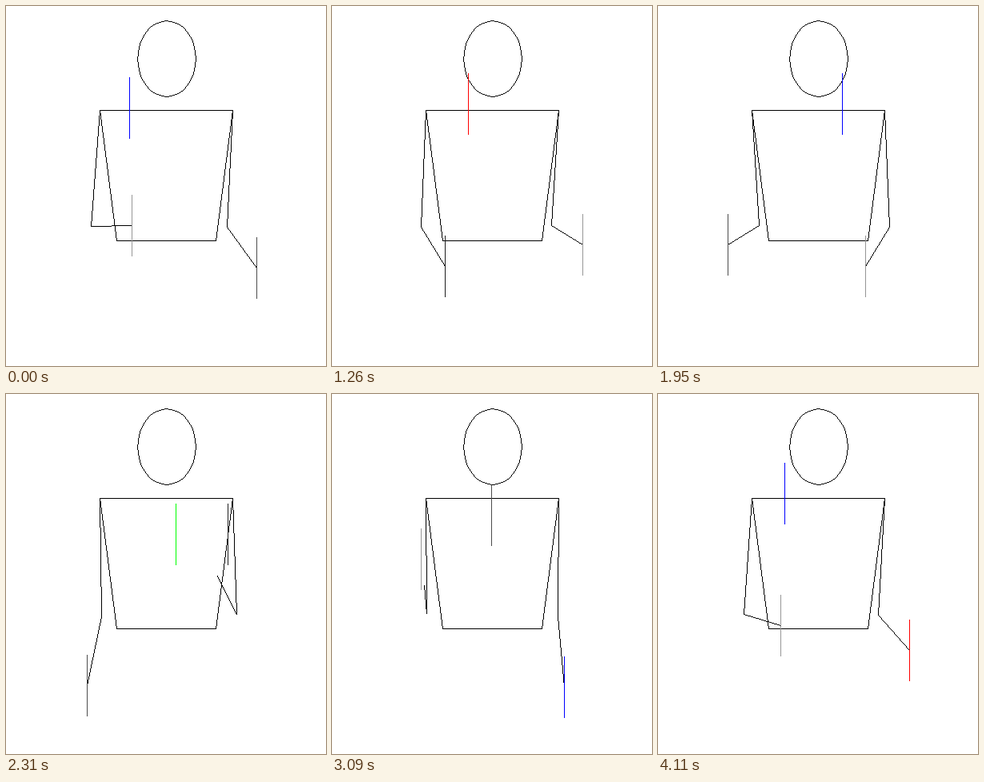
These frames come from a looping animation (400 px wide and 450 px high, 4.14 s). An HTML page with a canvas:

```html
<!DOCTYPE html>
<html lang="en">
<head>
<meta charset="utf-8">
<title>Three-stick cascade</title>
<style>
html, body { margin: 0; width: 100%; height: 100%; overflow: hidden; background: #fff; }
canvas { display: block; width: 400px; height: 450px; }
</style>
</head>
<body>
<canvas id="stage" width="400" height="450"></canvas>
<script>
const ctx = document.getElementById('stage').getContext('2d');

// All times are in steps of 30 ms.
const STEP = 30, LOOP = 138, BEAT = 23, CYCLE = 2 * BEAT, ORBIT = 3 * BEAT;
const FLIGHT = 39, HOLD = ORBIT - FLIGHT, EMPTY = CYCLE - HOLD;

const WIDTH = 400, BASE_Y = 273.9, THROW_X = 156.7, CATCH_X = 92, SPEED = 3.88;
const HALF = 38;                       // half a stick
const SHOULDER = [117, 130], ARM = 148.4, REACH = 108.6;

// Colour on even columns, its luma on odd ones.
const STICKS = [
  ['#00ff00', '#969696'],
  ['#ff0000', '#4c4c4c'],
  ['#0000ff', '#1d1d1d']
];

const mod = (a, n) => ((a % n) + n) % n;
const mirror = ([x, y]) => [WIDTH - x, y];
const bow = (s, a, b) => s * (1 - s) * (a + b * s);
const mix = (a, b, s) => a + (b - a) * s;

function flight(j) {
  return [THROW_X + SPEED * j, 121.8 + 0.4 * (j - FLIGHT / 2) ** 2];
}

function carry(s) {
  return [mix(CATCH_X, THROW_X, s) + bow(s, -133, 80), BASE_Y + bow(s, 245, 228)];
}

function goBack(s) {
  return [mix(THROW_X, CATCH_X, s) + bow(s, 125, -160), BASE_Y + bow(s, -248, 122)];
}

// Left hand; the right one is its mirror half a cycle later.
function hand(step) {
  const p = mod(step, CYCLE);
  return p < EMPTY ? goBack(p / EMPTY) : carry((p - EMPTY) / HOLD);
}

// Elbow of an arm reaching forward out of the picture plane.
function elbow([hx, hy]) {
  const dx = hx - SHOULDER[0], dy = hy - SHOULDER[1];
  const flat = Math.hypot(dx, REACH), dist = Math.hypot(flat, dy);
  const drop = Math.sqrt(Math.max(0, ARM * ARM - dist * dist / 4));
  const k = 1 - 2 * drop * dy / (flat * dist);
  return [SHOULDER[0] + dx * k / 2, SHOULDER[1] + dy / 2 + drop * flat / dist];
}

// Hard-edged line, one pixel wide
function line(a, b) {
  let [x, y] = a.map(Math.round);
  const [x1, y1] = b.map(Math.round);
  const dx = Math.abs(x1 - x), dy = -Math.abs(y1 - y);
  const sx = x < x1 ? 1 : -1, sy = y < y1 ? 1 : -1;
  let err = dx + dy;
  for (;;) {
    ctx.fillRect(x, y, 1, 1);
    if (x === x1 && y === y1) return;
    const e = 2 * err;
    if (e >= dy) { err += dy; x += sx; }
    if (e <= dx) { err += dx; y += sy; }
  }
}

function path(points) {
  for (let i = 1; i < points.length; i++) line(points[i - 1], points[i]);
}

const torso = [SHOULDER, mirror(SHOULDER), [262, 293], [138, 293], SHOULDER];
const head = Array.from({ length: 41 }, (_, i) => {
  const t = i * Math.PI / 20;
  return [200.4 + 36.2 * Math.cos(t), 65.5 + 47.3 * Math.sin(t)];
});

function drawStick(i, step) {
  const u = mod(step - BEAT * i, LOOP);
  const turn = Math.floor(u / ORBIT), j = u % ORBIT;
  const fromRight = (i + turn) % 2 === 1;
  const flying = j < FLIGHT;
  const pos = flying ? flight(j) : carry((j - FLIGHT) / HOLD);
  const [px, py] = fromRight === flying ? mirror(pos) : pos;
  const x = Math.round(px), y = Math.round(py);
  ctx.fillStyle = STICKS[i][x % 2];
  ctx.fillRect(x, y - HALF, 1, 2 * HALF + 1);
}

function draw(step) {
  ctx.fillStyle = '#fff';
  ctx.fillRect(0, 0, 400, 450);
  ctx.fillStyle = '#000';
  path(head);
  path(torso);
  const left = hand(step), right = hand(step + BEAT);
  path([SHOULDER, elbow(left), left]);
  path([SHOULDER, elbow(right), right].map(mirror));
  STICKS.forEach((_, i) => drawStick(i, step));
}

const start = performance.now();
function tick(now) {
  draw(Math.floor(Math.max(0, now - start) / STEP) % LOOP);
  requestAnimationFrame(tick);
}
draw(0);
requestAnimationFrame(tick);
</script>
</body>
</html>
```
